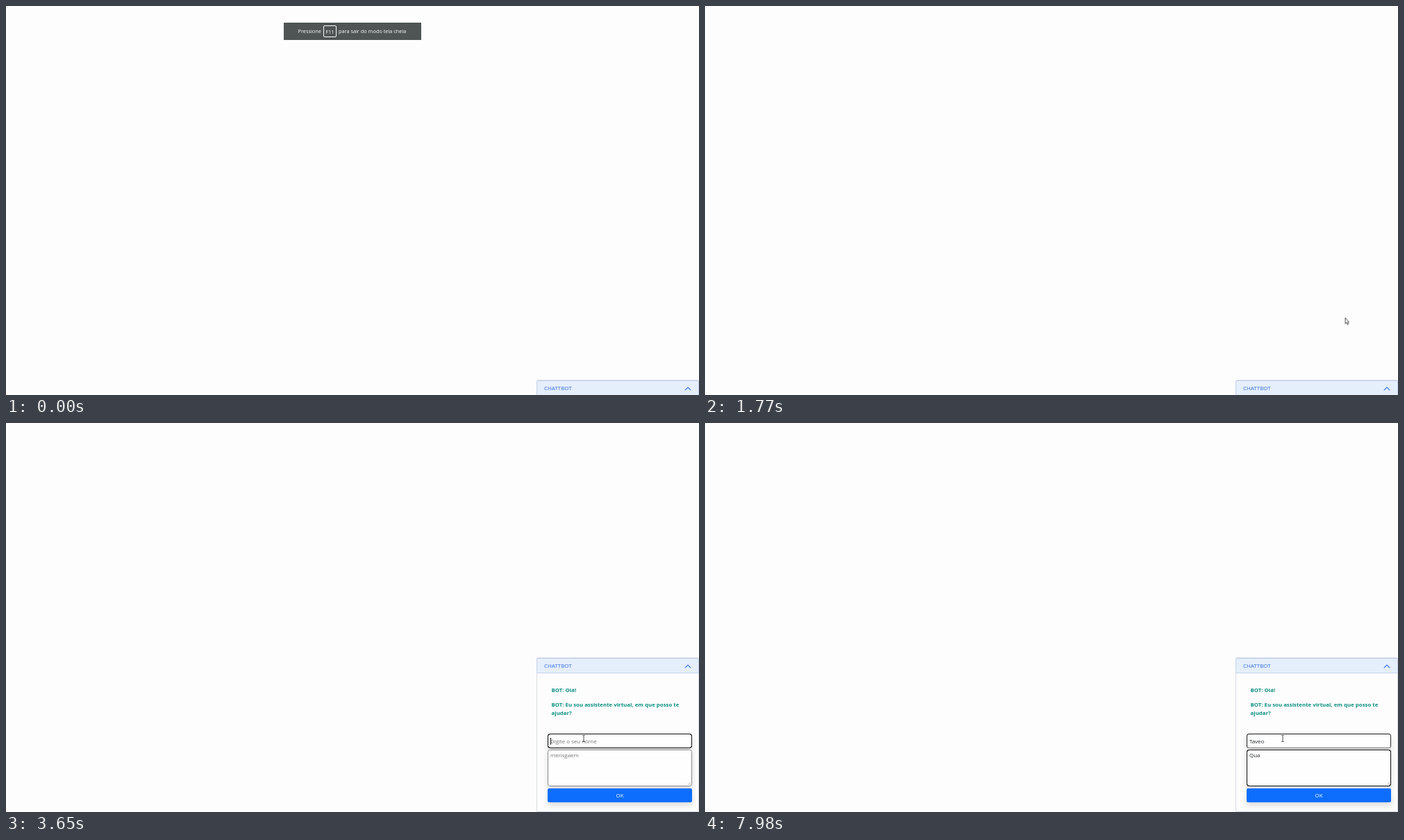
Animation of 998 by 561 pixels, one loop 8000 ms. Source, as an HTML page:

```html
<!DOCTYPE html>
<html lang="pt-BR">
<head>
<meta charset="utf-8">
<title>Chat</title>
<style>
  html, body { margin: 0; width: 100%; height: 100%; overflow: hidden; background: #fdfdfd; }
  * { box-sizing: border-box; }
  #stage {
    position: relative; width: 998px; height: 561px; overflow: hidden; background: #fdfdfd;
    font: 7.9px "Open Sans", "Noto Sans", sans-serif; color: #212529;
  }
  #stage div, #stage svg { position: absolute; }
  .text { white-space: pre; line-height: 12px; }

  /* full-screen notice */
  .notice {
    left: 400px; top: 23.5px; width: 198px; height: 25.5px;
    background: #4f5455; color: #fff; font-size: 7.35px;
    animation: fade 8s linear infinite;
  }
  .key { left: 57px; top: 4px; width: 18.5px; height: 17.5px; border: 1px solid #fff; border-radius: 2px; text-align: center; line-height: 16px; }
  @keyframes fade { 0%, .25% { opacity: 1 } 9.875%, 100% { opacity: 0 } }

  /* chat panel */
  .panel {
    left: 764px; top: 338px; width: 234px; height: 223px;
    border: 1px solid #d8dbe2; border-radius: 2px 2px 0 0; background: #fdfdfd;
    animation: slide 8s infinite;
  }
  @keyframes slide {
    0%, 32.91% { transform: translateY(201px); animation-timing-function: ease }
    37.29%, 100% { transform: none }
  }
  .head {
    left: -1px; top: 0; width: 234px; height: 22px; color: #2f6fdf;
    background: #e5eefb; border: 1px solid #c5d3ea; border-radius: 2px 2px 0 0;
    animation: ring 8s linear infinite;
  }
  @keyframes ring {
    0%, 32.91% { box-shadow: 0 0 0 0 #0d6efd40; border-color: #c5d3ea }
    34.79%, 43.75% { box-shadow: 0 0 0 2px #0d6efd40; border-color: #86b7fe }
    45.625%, 100% { box-shadow: 0 0 0 0 #0d6efd40; border-color: #c5d3ea }
  }
  .bot { left: 20.5px; color: #0b8f80; font-weight: 700; font-size: 7.85px; }
  .field { left: 15px; width: 208px; border-radius: 3.5px; background: #fefefe; box-shadow: 0 4px 8px #00000026; }
  .name { top: 109px; height: 21px; border: 1px solid; animation: nameFocus 8s step-end infinite; }
  .message { top: 132px; height: 53px; border: 1px solid; animation: messageFocus 8s step-end infinite; }
  @keyframes nameFocus {
    0%, 67.125% { border-color: #1c1c1c #333 #777 #1c1c1c; outline: .5px solid #0000 }
    43.75% { border-color: #101010; outline: 1px solid #101010; outline-offset: -1.5px }
  }
  @keyframes messageFocus {
    0% { border-color: #8b8b8b }
    67.125%, 100% { border-color: #101010; outline: 1px solid #101010; outline-offset: -1.5px }
  }
  .entry { left: 3px; }
  .hint { color: #757575; }
  .entry i { display: inline-block; width: 1px; height: 10px; margin-right: -1px; vertical-align: -2px; background: #111; }
  .ok {
    left: 15px; top: 187.5px; width: 208px; height: 20.5px; border-radius: 2px;
    background: #0d6efd; color: #fff; text-align: center; line-height: 20px; box-shadow: 0 4px 8px #00000026;
  }

  /* pointer */
  .pointer { left: 0; top: 0; width: 0; height: 0; animation: travel 8s linear infinite; }
  .pointer svg { overflow: visible; width: 1px; height: 1px; left: 0; top: 0; fill: #fff; stroke: #222; stroke-width: .8; animation: 8s step-end infinite; }
  .pointer .arrow { animation-name: arrow; }
  .pointer .hand { animation-name: hand; }
  .pointer .beam { animation-name: beam; fill: none; }
  @keyframes arrow { 0%, 27.4%, 100% { opacity: 0 } 10.625% { opacity: 1 } }
  @keyframes hand { 0%, 41.6%, 100% { opacity: 0 } 27.4% { opacity: 1 } }
  @keyframes beam { 0% { opacity: 0 } 41.6%, 100% { opacity: 1 } }
  @keyframes travel {
    0%, 10.625% { transform: translate(112px, 146px) }
    14% { transform: translate(480px, 300px) }
    17.5% { transform: translate(985px, 478px) }
    20.6% { transform: translate(946px, 395px) }
    22.125% { transform: translate(922px, 449px) }
    25% { transform: translate(862px, 510px) }
    28% { transform: translate(828px, 545px) }
    30.25%, 31% { transform: translate(838px, 550px) }
    32%, 39% { transform: translate(839px, 557px) }
    41% { transform: translate(838px, 535px) }
    43% { transform: translate(834px, 472px) }
    45.5%, 100% { transform: translate(832px, 455px) }
  }
</style>
</head>
<body>
<div id="stage">
  <div class="notice">
    <div class="text" style="left:20.5px;top:6.5px">Pressione</div>
    <div class="key">F11</div>
    <div class="text" style="left:79px;top:6.5px">para sair do modo tela cheia</div>
  </div>

  <div class="panel">
    <div class="head">
      <div class="text" style="left:10px;top:4px">CHATTBOT</div>
      <svg style="left:212px;top:7px" width="11" height="8" fill="none" stroke="#2f6fdf" stroke-width="1.1"><path d="M.8 6.2 5 2l4.200 4.200"/></svg>
    </div>
    <div class="text bot" style="top:39.5px">BOT: Olá!</div>
    <div class="text bot" style="top:60.500px">BOT: Eu sou assistente virtual, em que posso te
ajudar?</div>
    <div class="field name"><div class="text entry" id="name" style="top:4px"></div></div>
    <div class="field message">
      <div class="text entry" id="message" style="top:1px"></div>
      <svg style="right:0;bottom:0" width="6" height="6" stroke="#888" stroke-width=".6"><path d="M1 5 5 1M3.500 5 5 3.500"/></svg>
    </div>
    <div class="ok">OK</div>
  </div>

  <div class="pointer">
    <svg class="arrow"><path d="M.3 .3V9L2.200 7.300 3.500 10.200 4.800 9.600 3.500 6.800H5.800Z"/></svg>
    <svg class="hand"><path d="M-.8 6V.8Q0-.4 .8 .8V4L4.800 5Q5.800 5.500 5.300 8L4.500 10.500H-.3L-3 7Q-2.800 5.500-.8 7Z"/></svg>
    <svg class="beam"><path d="M-1.800-4.500H-.5L0-4 .5-4.500H1.800M0-4V4M-1.800 4.500H-.5L0 4 .5 4.500H1.800"/></svg>
  </div>
</div>

<script>
  const LOOP = 8000, BLINK = 500;
  const fields = [
    { id: 'name', hint: 'Digite o seu nome', text: 'Taveo', keys: [4510, 4640, 4930, 5060, 5190], focus: 3560, blur: 5370 },
    { id: 'message', hint: 'mensgaem', text: 'Qua', keys: [6500, 6950, 7340], focus: 5460, blur: LOOP }
  ];
  // The caret shows as soon as the field is entered, slightly before its blink phase starts.
  const LEAD = 90;

  function draw(field, t) {
    const el = document.getElementById(field.id);
    const typed = field.keys.filter(k => k <= t);
    const since = t - (typed.length ? typed[typed.length - 1] : field.focus);
    const active = t >= field.focus - LEAD && t < field.blur;
    const caret = active && (since < 0 || Math.floor(since / BLINK) % 2 === 0) ? '<i></i>' : '';
    const value = field.text.slice(0, typed.length);
    const html = value ? value + caret : caret + '<span class="hint">' + field.hint + '</span>';
    if (field.html !== html) el.innerHTML = field.html = html;
  }

  function tick() {
    const t = performance.now() % LOOP;
    fields.forEach(f => draw(f, t));
    requestAnimationFrame(tick);
  }
  tick();
</script>
</body>
</html>
```
